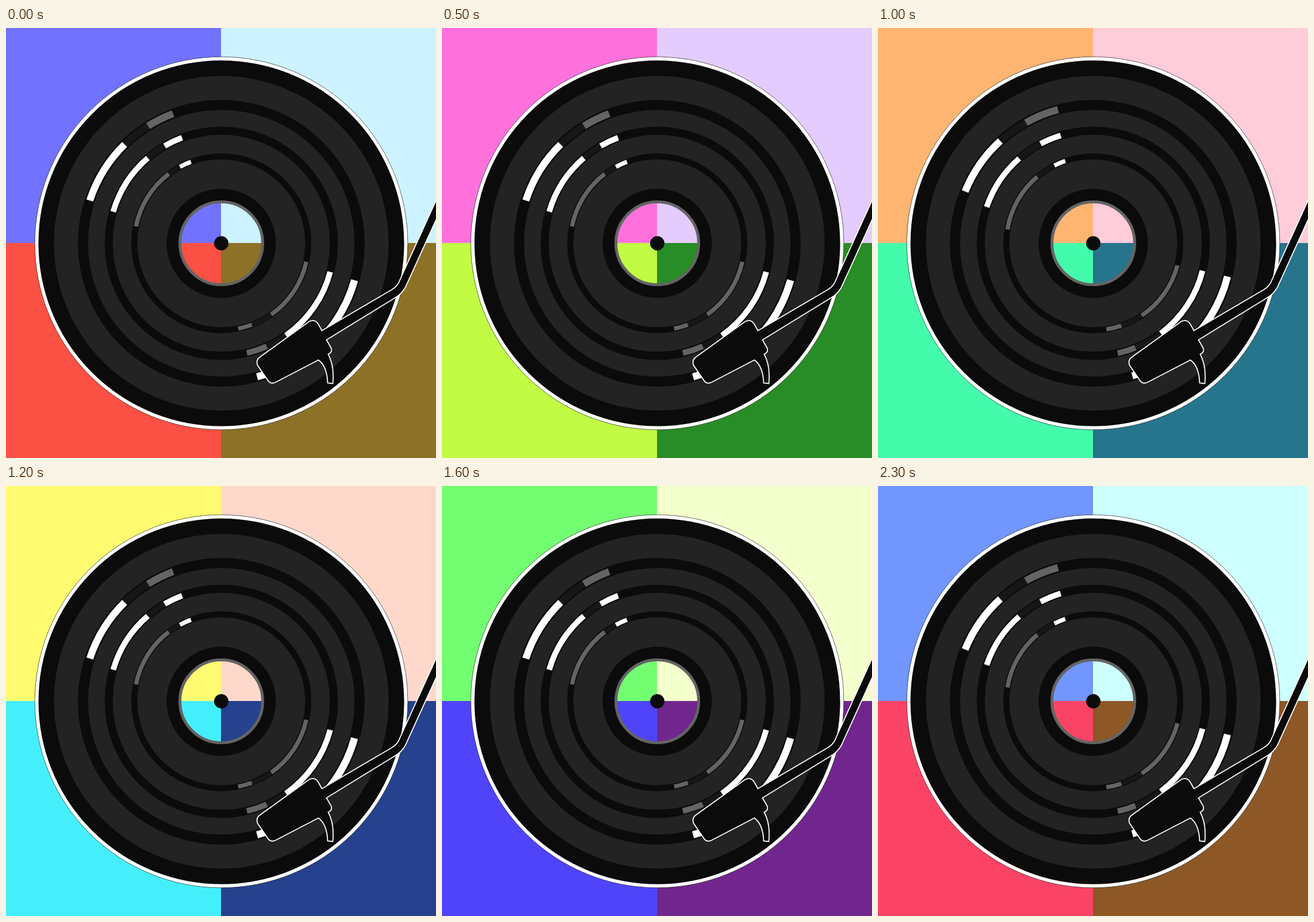
These frames come from a looping animation (748 px wide and 748 px high, 2400 ms). An HTML page with a canvas:

```html
<!DOCTYPE html>
<html lang="en">
<head>
<meta charset="utf-8">
<title>Turntable</title>
<style>
  html, body { margin: 0; height: 100%; overflow: hidden; }
  canvas { display: block; }
</style>
</head>
<body>
<canvas width="748" height="748"></canvas>
<script>
const ctx = document.querySelector('canvas').getContext('2d');
const HALF = 374, MID = HALF + 0.5, STEP = 100, STEPS = 24;
const BLACK = '#0b0b0b', VINYL = '#232323', DARK = '#171717', GREY = '#646464', WHITE = '#fff';

// Starting hue, saturation and lightness, row by row
const quads = [[239, 98, 71.8], [194, 100, 90], [4, 96, 62.5], [44, 57.5, 35]];

const arm = new Path2D(`M760 272 L685 437 Q681 449 670 455 L549 526 L543 515
  Q537 505 527 510 L441 572 Q434 577 437 586 L454 611 Q459 620 468 616
  L543 577 Q558 588 559 617 L568 618 Q571 587 560 567 Q568 563 565 556
  L557 542 L676 469 Q687 463 694 451 L760 306`);

function ring(radius, width, color, from = 0, to = 360) {
  ctx.beginPath();
  ctx.arc(MID, MID, radius, from * Math.PI / 180, to * Math.PI / 180);
  ctx.lineWidth = width;
  ctx.strokeStyle = color;
  ctx.stroke();
}

function band(inner, outer, color) {
  ring((inner + outer) / 2, outer - inner, color);
}

// Groove k counts inwards; sway (0 or 1) shifts the ends of its glints
function groove(k, sway) {
  const radius = 240.5 - 44.6 * k, width = 17.6 - 3.5 * k, k2 = k * k;
  const glint = (colors, angles) => colors.forEach((color, i) =>
    ring(radius, width * 0.7, color, angles[i], angles[i + 1]));

  ring(radius, width, BLACK);
  glint([k < 2 ? WHITE : GREY, DARK, k ? WHITE : GREY], [
    198 - 1.7 * k2 + sway * (4 - 1.5 * k2),
    225.7 + 3.6 * k + sway * (2.1 - 2.5 * k),
    238 + 1.8 * k + sway * (2.8 - 0.5 * k),
    249.6 + sway * (5.6 - 2 * k)
  ]);
  glint([k < 2 ? WHITE : GREY, DARK, k ? GREY : WHITE], [
    15.5 - 0.8 * k2 + sway * (k2 - 1.6),
    55 + sway * (3 * k - 4.8),
    63 + 3.2 * k + sway * 1.8,
    75 + 1.9 * k + sway * (2 * k - 1.4)
  ]);
}

function draw(time) {
  const step = Math.floor(time / STEP) % STEPS;
  const sway = step % 4 < 2 ? 0 : 1;

  quads.forEach(([hue, sat, light], i) => {
    ctx.fillStyle = `hsl(${hue + step * 360 / STEPS}, ${sat}%, ${light}%)`;
    ctx.fillRect(i % 2 * HALF, (i >> 1) * HALF, HALF, HALF);
  });

  band(318, 324.3, WHITE);
  ring(324.4, 0.7, VINYL);
  band(72, 318, BLACK);
  band(95, 291, VINYL);
  for (let k = 0; k < 3; k++) groove(k, sway);
  band(69.5, 74.5, GREY);
  band(0, 12.5, BLACK);

  ctx.save();
  ctx.translate(0.5, 0.5);
  ctx.fillStyle = BLACK;
  ctx.fill(arm);
  ctx.strokeStyle = WHITE;
  ctx.lineWidth = 1.8;
  ctx.stroke(arm);
  ctx.restore();
  requestAnimationFrame(draw);
}
requestAnimationFrame(draw);
</script>
</body>
</html>
```
